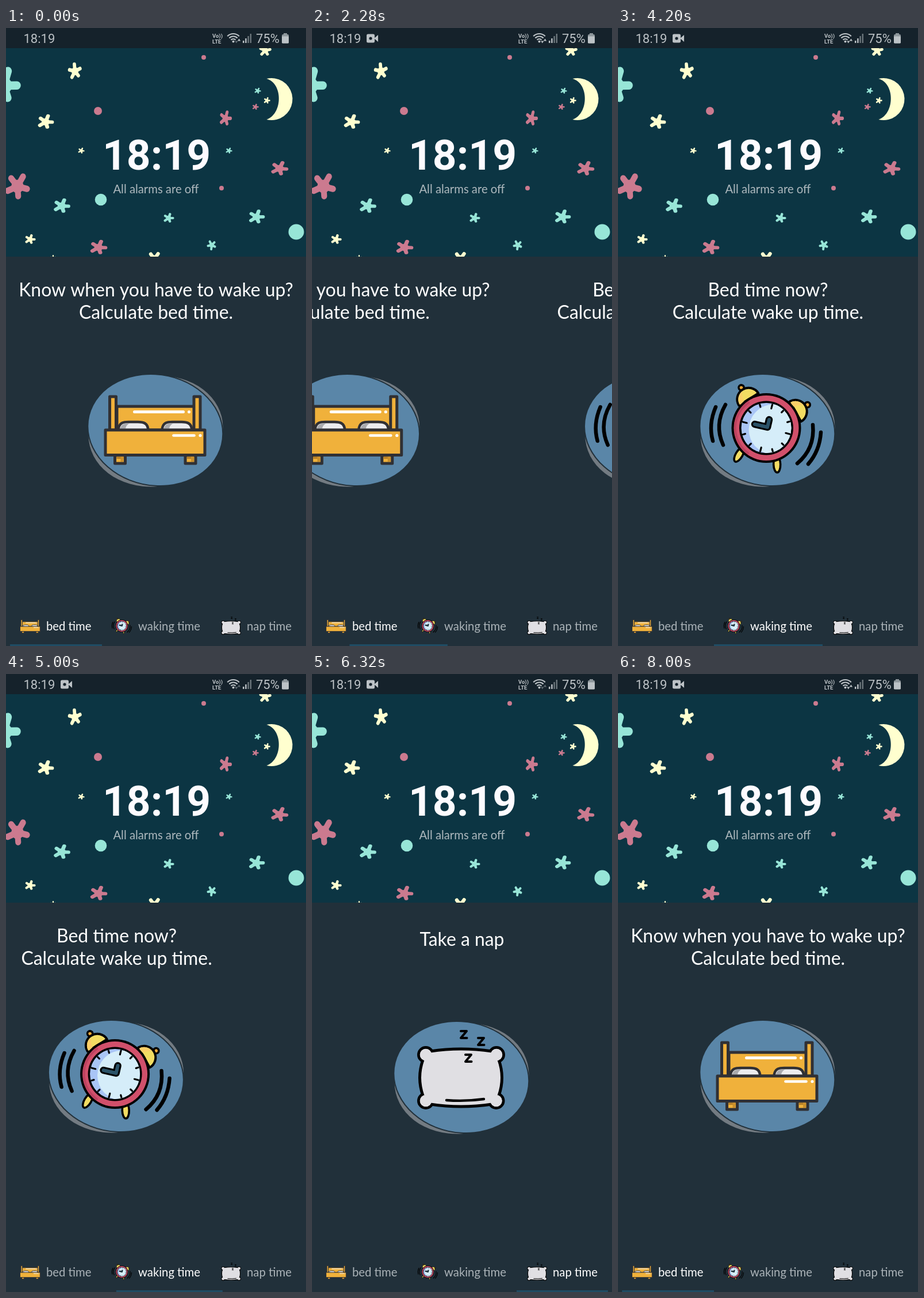
These frames come from a looping animation (522 px wide and 1073 px high, 8080 ms). An HTML page with a canvas:

```html
<!DOCTYPE html>
<html lang="en">
<head>
<meta charset="utf-8">
<title>Sleep timer</title>
<style>
html, body { margin: 0; width: 100%; height: 100%; overflow: hidden; background: #21303a; }
canvas { display: block; width: 522px; height: 1073px; }
</style>
</head>
<body>
<canvas id="stage"></canvas>
<script>
const W = 522, H = 1073, LOOP = 8080;
const canvas = document.getElementById('stage');
const c = canvas.getContext('2d');
const dpr = window.devicePixelRatio || 1;
canvas.width = W * dpr;
canvas.height = H * dpr;

const CREAM = '#ffffcf', MINT = '#97e5d7', PINK = '#cb7a8f';
const BODY = '#21303a', YELLOW = '#f0b13b', INK = '#303034', STATUS = '#bcc2c6';
const HEADLINE = '31.9px Lato, sans-serif', LABEL = '20.3px Lato, sans-serif';
const TAU = Math.PI * 2;

// ---------- helpers ----------
const clamp = v => Math.max(0, Math.min(1, v));
const mix = (a, b, p) => a + (b - a) * p;
const inOut = u => u < .5 ? 4 * u ** 3 : 1 - 4 * (1 - u) ** 3;
const outQuint = u => 1 - (1 - u) ** 5;
const span = (t, start, length) => clamp((t - start) / length);

function group(x, y, scale, draw) {
  c.save();
  c.translate(x, y);
  c.scale(scale, scale);
  draw();
  c.restore();
}

function paint(fill, stroke, width) {
  if (fill) { c.fillStyle = fill; c.fill(); }
  if (stroke) { c.strokeStyle = stroke; c.lineWidth = width; c.stroke(); }
}

function disc(x, y, r, fill, stroke, width) {
  c.beginPath();
  c.arc(x, y, r, 0, TAU);
  paint(fill, stroke, width);
}

function box(x1, y1, x2, y2, fill, stroke, width) {
  c.beginPath();
  c.rect(x1, y1, x2 - x1, y2 - y1);
  paint(fill, stroke, width);
}

function line(x1, y1, x2, y2, color, width) {
  c.beginPath();
  c.moveTo(x1, y1);
  c.lineTo(x2, y2);
  paint(null, color, width);
}

function curve(x1, y1, qx, qy, x2, y2, color, width) {
  c.beginPath();
  c.moveTo(x1, y1);
  c.quadraticCurveTo(qx, qy, x2, y2);
  paint(null, color, width);
}

function text(str, x, y, font, color, align = 'left') {
  c.font = font;
  c.fillStyle = color;
  c.textAlign = align;
  c.fillText(str, x, y);
}

// ---------- night sky ----------
// Starfish: five stubby round arms around a soft core.
function star(x, y, rx, ry, turn, color) {
  c.save();
  c.translate(x, y);
  c.scale(rx, ry);
  c.lineCap = 'round';
  c.beginPath();
  for (let i = 0; i < 5; i++) {
    const a = turn + i * TAU / 5 - TAU / 4;
    const reach = .8 - .06 * (i % 3);
    c.moveTo(0, 0);
    c.lineTo(reach * Math.cos(a), reach * Math.sin(a));
  }
  paint(null, color, .44);
  disc(0, 0, .46, color);
  c.restore();
}

const stars = [
  [120, 75, 13, 15, -.1, CREAM], [69, 163, 15, 13.5, .35, CREAM],
  [131, 213, 6, 5.5, .4, CREAM], [42, 367, 10, 9, .3, CREAM],
  [451, 39, 11.5, 11, .1, CREAM], [454, 126, 6, 6, .3, CREAM],
  [258, 401, 14, 14, .63, CREAM], [82, 399, 5, 5, 0, CREAM],
  [-4, 100, 31, 33, .3, MINT], [97, 309, 15.5, 13.5, .35, MINT],
  [283, 330, 10, 9, .3, MINT], [436, 328, 15, 13, .3, MINT],
  [358, 377, 9, 9, -.5, MINT], [388, 213, 6, 5.5, .4, MINT],
  [438, 109, 6, 5.5, .4, MINT],
  [20, 275, 23, 25, .55, PINK], [161, 381, 16, 13.5, .35, PINK],
  [382, 157, 11.5, 14, .3, PINK], [476, 244, 16, 13.5, .4, PINK],
  [434, 137, 6, 5.5, .3, PINK]
];
const dots = [
  [344, 51, 4, PINK], [160, 144, 7, PINK], [375, 278, 4, PINK],
  [165, 298, 10.3, MINT], [505, 354, 13.5, MINT]
];

function drawSky() {
  c.save();
  c.beginPath();
  c.rect(0, 35, W, 362);
  c.clip();
  paint('#0c3543');
  stars.forEach(s => star(...s));
  dots.forEach(d => disc(...d));
  c.beginPath();
  c.arc(462, 123.5, 36.5, -1.81, 1.81);
  c.bezierCurveTo(481, 150, 483, 97, 453.5, 88);
  c.closePath();
  paint(CREAM);
  c.restore();
  text('18:19', 262, 245.5, 'bold 73px Roboto, sans-serif', '#fdfbff', 'center');
  text('All alarms are off', 261, 287, LABEL, '#aeb9be', 'center');
}

// ---------- pictures, each centred on its own origin ----------
function pillowBump(x) {
  c.beginPath();
  c.moveTo(x - 26, 0);
  c.bezierCurveTo(x - 25, -14, x - 16, -14, x - 8, -14);
  c.lineTo(x + 8, -14);
  c.bezierCurveTo(x + 18, -14, x + 25, -12, x + 26, 0);
  c.closePath();
  paint('#ececee', INK, 4.5);
  c.beginPath();
  c.moveTo(x - 23, 0);
  c.bezierCurveTo(x - 22, -11, x - 15, -12, x - 6, -12);
  c.quadraticCurveTo(x - 13, -9, x - 14, 0);
  c.closePath();
  paint('#a9aaae');
}

function drawBed() {
  c.lineCap = 'round';
  c.lineJoin = 'round';
  box(-66.5, -41, 68.5, 0, YELLOW, INK, 5);
  [-73.5, 73].forEach(x => box(x - 5.5, -58, x + 5.5, 0, YELLOW, INK, 5));
  line(-36, -31.5, 49, -31.5, '#fff', 5);
  disc(59, -31.5, 2.6, '#fff');
  pillowBump(-38);
  pillowBump(38);
  [-61, 61.5].forEach(x => {
    box(x - 9, 44, x + 9, 58, YELLOW, INK, 5);
    box(x - 6, 46, x + 6, 50, '#b57f27');
    box(x + 1, 46, x + 6, 55, '#c98f2c');
  });
  box(-86.5, 0, 86.5, 43.5, YELLOW, INK, 5);
  line(32, 9.5, 68, 9.5, '#fff', 4.6);
  disc(78.5, 9.5, 2.6, '#fff');
}

function bell(side) {
  c.save();
  c.rotate(side * .811);
  disc(0, -82, 4.6, '#e9a637', '#000', 3.6);
  c.beginPath();
  c.arc(0, -58, 20, Math.PI, 0);
  c.closePath();
  paint('#f2dc62', '#000', 4);
  c.beginPath();
  c.arc(0, -58, 18, Math.PI, -1.7);
  c.quadraticCurveTo(-8, -68, -9, -58);
  c.closePath();
  paint('#fbcf68');
  c.restore();
}

function drawClock() {
  c.lineCap = 'round';
  c.lineJoin = 'round';
  curve(-71, -40, -91, -5, -75, 30, '#000', 6.5);
  curve(-88, -36, -101, -6, -93, 23, '#000', 6.5);
  curve(81, -5, 85, 36, 54, 62, '#000', 6.5);
  curve(95, 8, 93, 40, 73, 63, '#000', 6.5);
  c.save();
  c.rotate(.253);
  [-1, 1].forEach(side => {
    bell(side);
    c.beginPath();
    c.ellipse(side * 34, 57, 6, 14, -side * .28, 0, TAU);
    paint('#f2dc62', '#000', 3.6);
  });
  c.restore();

  disc(0, .5, 60.5, '#000');
  disc(0, .5, 56.5, '#d1506b');
  c.beginPath();
  c.arc(0, .5, 54, 2.2, 4.1);
  paint(null, '#bd425f', 4);
  disc(0, .5, 47, '#000');
  disc(0, .5, 43.5, '#a9c5f6');
  c.save();
  c.beginPath();
  c.arc(0, .5, 43.5, 0, TAU);
  c.clip();
  disc(13, 3, 43.5, '#d5edf9');
  c.restore();
  for (let i = 0; i < 12; i++) {
    const a = .253 + i * TAU / 12, x = Math.cos(a), y = Math.sin(a);
    const inner = i % 3 ? 38 : 35;
    line(x * inner, y * inner + .5, x * 42, y * 42 + .5, '#000', 3.2);
  }
  [['#000', 12.5], ['#2b5368', 6]].forEach(([color, width]) => {
    c.beginPath();
    c.moveTo(-20, -6);
    c.lineTo(2, -1);
    c.lineTo(5, -14);
    paint(null, color, width);
  });
}

function zed(x, y) {
  c.beginPath();
  c.moveTo(x - 5, y - 6);
  c.lineTo(x + 5, y - 6);
  c.lineTo(x - 5, y + 6);
  c.lineTo(x + 5.5, y + 6);
  paint(null, '#000', 4);
}

function drawPillow() {
  const fill = '#e0dfe3';
  c.lineCap = 'round';
  c.lineJoin = 'round';
  const ears = [[-61, -40], [62, -40], [-61, 40], [61.5, 40]];
  ears.forEach(([x, y]) => disc(x, y, 12.5, fill, '#000', 5));
  c.beginPath();
  c.moveTo(-53, -46);
  c.quadraticCurveTo(0, -54, 54, -46);
  c.lineTo(66, -31);
  c.quadraticCurveTo(77, 0, 66, 31);
  c.lineTo(54, 46);
  c.quadraticCurveTo(0, 54, -53, 46);
  c.lineTo(-66, 31);
  c.quadraticCurveTo(-77, 0, -66, -31);
  c.closePath();
  paint(fill, '#000', 5);
  ears.forEach(([x, y]) => disc(x, y, 10.3, fill));
  curve(-25, 39, 8, 41.5, 40, 37, '#000', 4.4);
  zed(5, -75);
  zed(35, -63);
  zed(13, -34);
}

// ---------- pages ----------
function oval(x, y, a, b, skew, fill, edge) {
  c.save();
  c.transform(a, b * Math.sin(skew), 0, b * Math.cos(skew), x, y);
  c.beginPath();
  c.arc(0, 0, 1, 0, TAU);
  c.restore();
  paint(fill, edge, 4);
}

const pages = [
  { lines: ['Know when you have to wake up?', 'Calculate bed time.'], top: 466, pic: drawBed, x: 259.5, y: 698, drop: 0 },
  { lines: ['Bed time now?', 'Calculate wake up time.'], top: 466, pic: drawClock, x: 258, y: 694, drop: 0 },
  { lines: ['Take a nap'], top: 472, pic: drawPillow, x: 259, y: 701, drop: 2 }
];

function drawPage(page, shift) {
  if (Math.abs(shift) >= W) return;
  c.save();
  c.translate(shift, 0);
  page.lines.forEach((s, i) =>
    text(s, 261, page.top + i * 38.5, HEADLINE, '#fff', 'center'));
  oval(260.5, 700.3 + page.drop, 117, 96.3, -.069, '#737b82');
  oval(259.8, 698 + page.drop, 116.5, 96, .069, '#5a86a8', BODY);
  oval(259.8, 698 + page.drop, 116.5, 96, .069, '#5a86a8');
  group(page.x, page.y, 1, page.pic);
  c.restore();
}

// ---------- tabs ----------
const tabs = [
  { name: 'bed time', left: 7, right: 167, textX: 70, iconX: 42, iconY: 1039, scale: .2 },
  { name: 'waking time', left: 167, right: 356, textX: 230, iconX: 201.5, iconY: 1038, scale: .178 },
  { name: 'nap time', left: 356, right: 515, textX: 419, iconX: 391.5, iconY: 1041, scale: .225 }
];

function drawRipple(t) {
  const grow = span(t, 7240, 212), fade = 1 - span(t, 7560, 220);
  if (!grow || !fade) return;
  c.save();
  c.beginPath();
  c.rect(7, 1004, 160, 69);
  c.clip();
  disc(87, 1039, 90 * grow, `rgba(255,255,255,${.41 * fade})`);
  c.restore();
}

function drawTabs(t, active, edge) {
  drawRipple(t);
  tabs.forEach((tab, i) => {
    group(tab.iconX, tab.iconY, tab.scale, pages[i].pic);
    text(tab.name, tab.textX, 1046, LABEL, i === active ? '#fff' : '#abb3b8');
  });
  box(edge('left'), 1070, edge('right'), H, '#1f4c64');
}

// ---------- status bar ----------
function arrow(x, dir, color) {
  c.beginPath();
  c.moveTo(x - 2.6, 22.5);
  c.lineTo(x + 2.6, 22.5);
  c.lineTo(x, 22.5 + dir * 4);
  c.closePath();
  paint(color);
}

function drawStatus(t) {
  box(0, 0, W, 35, '#15222b');
  text('18:19', 30.5, 26, '22px Roboto, sans-serif', STATUS);
  text('75%', 435, 26, '22px Roboto, sans-serif', STATUS);
  text('Vo))', 359, 17, 'bold 9.5px Roboto, sans-serif', STATUS);
  text('LTE', 359, 26.5, 'bold 9.5px Roboto, sans-serif', STATUS);

  if (t >= 480) {
    c.beginPath();
    c.roundRect(95, 10.5, 14, 15, 2.5);
    c.moveTo(108, 18);
    c.lineTo(115, 12);
    c.lineTo(115, 24);
    c.closePath();
    paint(STATUS);
    disc(102, 18, 2.6, '#15222b');
  }

  c.lineCap = 'butt';
  [5.5, 10, 14.5].forEach(r => {
    c.beginPath();
    c.arc(395.5, 24.5, r, -2.36, -.78);
    paint(null, STATUS, 2.2);
  });
  disc(395.5, 23.5, 2, STATUS);
  const dim = '#5f6a71', idle = t > 4600 && t < 7100;
  arrow(400.8, 1, idle || t < 480 ? dim : STATUS);
  arrow(405.5, -1, idle ? dim : STATUS);

  for (let i = 0; i < 4; i++) {
    box(412 + i * 4.2, 22 - i * 4, 414.4 + i * 4.2, 26, i < 2 ? STATUS : '#6c767c');
  }
  box(483, 9, 489, 12, '#8d969b');
  c.beginPath();
  c.roundRect(480, 11, 12, 16, 2);
  paint('#8d969b');
  box(480, 14.5, 492, 26, STATUS);
}

// ---------- timeline ----------
const TAP = 7338;

function render(t) {
  const first = inOut(span(t, 2010, 600));
  const second = inOut(span(t, 4776, 700));
  const swiped = first + second;
  const page = swiped - 2 * outQuint(span(t, TAP, 560));
  const active = t >= TAP ? 0 : Math.round(swiped);

  // The marker follows swipes tab by tab, but a tap sends it straight home.
  const home = inOut(span(t, TAP, 177));
  const edge = side => mix(
    mix(mix(tabs[0][side], tabs[1][side], first), tabs[2][side], second),
    tabs[0][side], home);

  c.setTransform(dpr, 0, 0, dpr, 0, 0);
  box(0, 0, W, H, BODY);
  pages.forEach((p, i) => drawPage(p, (i - page) * W));
  drawSky();
  drawTabs(t, active, edge);
  drawStatus(t);
}

let begin = null;
function tick(now) {
  if (begin === null) begin = now;
  render((now - begin) % LOOP);
  requestAnimationFrame(tick);
}
requestAnimationFrame(tick);
</script>
</body>
</html>
```
